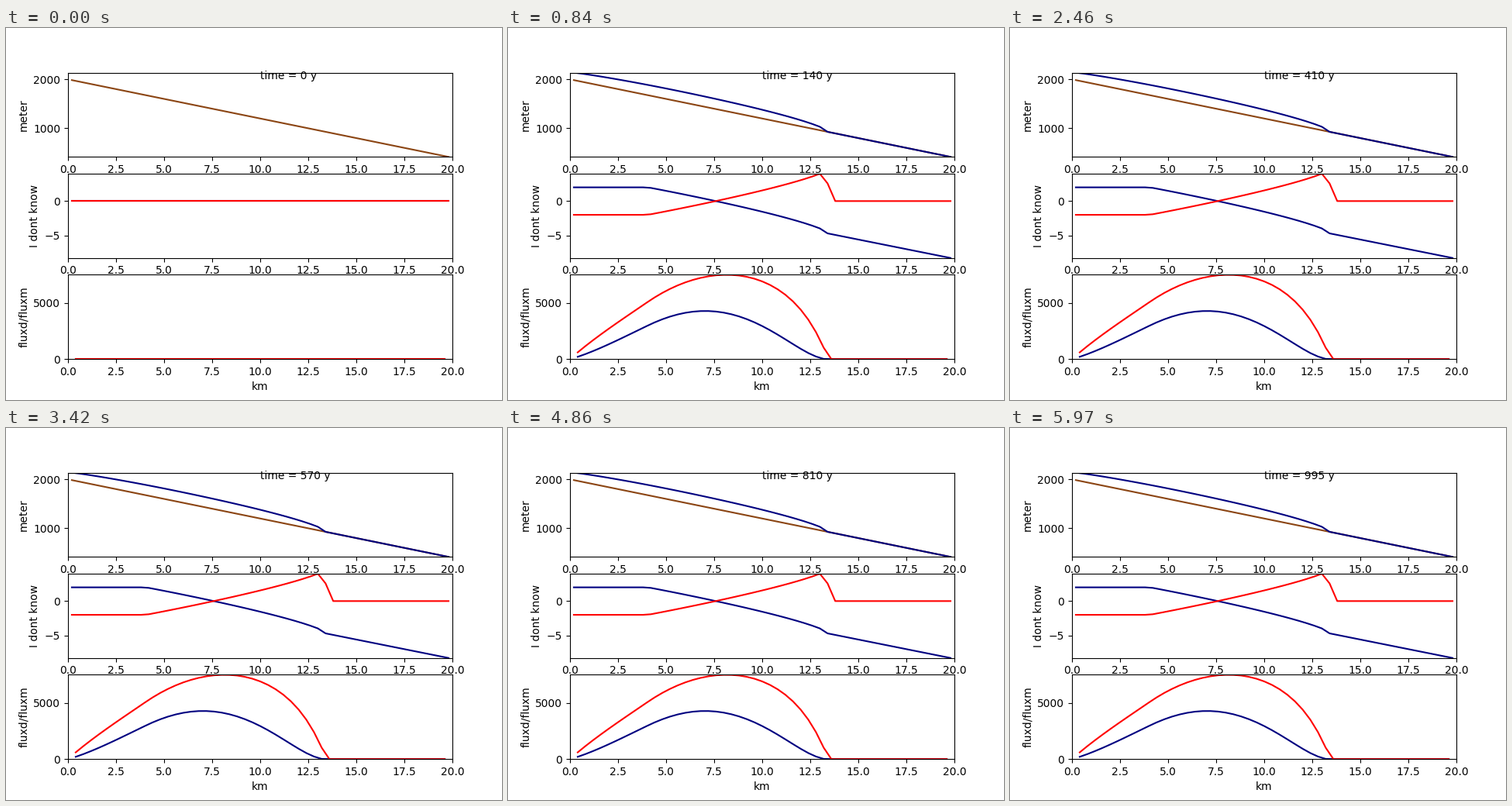
A matplotlib script that plays this animation: 640x480 px, repeating every 6000 ms.

```python
import numpy as np
import matplotlib.pyplot as plt
from matplotlib.animation import FuncAnimation

FRAMES, INTERVAL, YEARS_PER_FRAME = 200, 30, 5

# Flow-line glacier on a linear slope
YEAR = 3.156e7
RHO_G = 917 * 9.81
DEFORM = 0.4 * 1.9e-24 * YEAR * RHO_G**3
SLIDE = 5.7e-20 * YEAR * RHO_G**3
DX, DT, SPAN = 400.0, 0.1, 1000
ELA, GRADIENT, MAX_BALANCE = 1600, 0.007, 2.0

x = np.arange(DX / 2, 20000, DX)
x_mid = (x[1:] + x[:-1]) / 2
bed = 2000 - 0.08 * x


def mass_balance(surface):
    return np.minimum(MAX_BALANCE, GRADIENT * (surface - ELA))


def fluxes(ice):
    slope = -np.diff(bed + ice) / DX
    mean = (ice[1:] + ice[:-1]) / 2
    drive = (mean * slope) ** 3
    return DEFORM * mean**2 * drive, SLIDE * drive


def convergence(flux):
    q = np.zeros(len(x) + 1)
    q[1:-1] = flux
    return -np.diff(q) / DX


def grow():
    ice = np.zeros_like(x)
    for _ in range(int(SPAN / DT)):
        qd, qs = fluxes(ice)
        rate = convergence(qd + qs) + mass_balance(bed + ice)
        ice = np.maximum(ice + DT * rate, 0)
    return ice


ice = grow()
surface = bed + ice
balance = mass_balance(surface)
flux_d, flux_s = fluxes(ice)
inflow = convergence(flux_d + flux_s)

fig, (top, mid, low) = plt.subplots(3, 1, figsize=(6.4, 4.8), dpi=100)
km, km_mid = x / 1000, x_mid / 1000

top.plot(km, bed, color="saddlebrown")


def curve(ax, xs, color, values):
    line, = ax.plot(xs, np.zeros_like(xs), color=color)
    return line, values


curves = [
    curve(top, km, "navy", surface),
    curve(mid, km, "navy", balance),
    curve(mid, km, "red", inflow),
    curve(low, km_mid, "navy", flux_d),
    curve(low, km_mid, "red", flux_s),
]
label = top.text(10, 2000, "")

top.set_ylim(bed.min(), surface.max())
mid.set_ylim(balance.min(), inflow.max())
low.set_ylim(0, flux_s.max())
for ax, name in zip((top, mid, low), ("meter", "I dont know", "fluxd/fluxm")):
    ax.set_xlim(0, 20)
    ax.set_ylabel(name)
low.set_xlabel("km")


def update(i):
    # Empty state first, then the settled glacier
    for line, values in curves:
        line.set_ydata(values if i else np.zeros_like(values))
    label.set_text(f"time = {i * YEARS_PER_FRAME} y")
    return [line for line, _ in curves] + [label]


anim = FuncAnimation(fig, update, frames=FRAMES, interval=INTERVAL,
                     repeat=True, repeat_delay=0)
plt.show()
```
